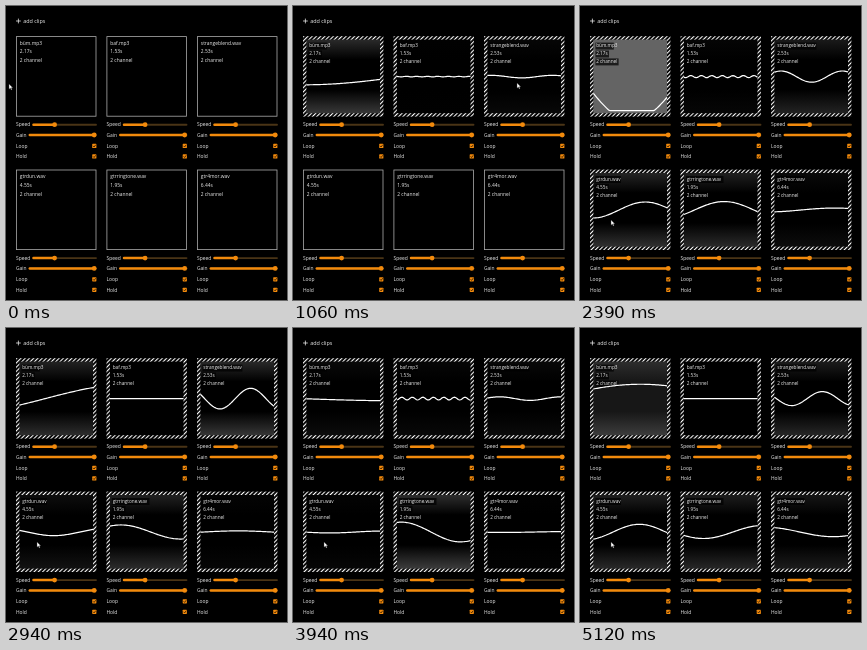
Animation, 281 px wide and 294 px high, one loop 5.18 s. Source, as an HTML page:

```html
<!DOCTYPE html>
<html lang="en">
<head>
<meta charset="utf-8">
<title>Clip launcher</title>
<style>
  html, body { margin: 0; width: 100%; height: 100%; overflow: hidden; background: #000; }
  svg { display: block; width: 281px; height: 294px; }
  text { font: 4.9px "Open Sans", "Noto Sans", sans-serif; fill: #eee; }
  .add { font-size: 5.4px; }
  .live text { font-size: 4.7px; }
  .idle rect { fill: none; stroke: #aaa; stroke-width: .8; }
  .wave { fill: none; stroke: #fff; stroke-width: 1.2; stroke-linejoin: round; }
  .rail { stroke: #4a3416; stroke-width: 1.9; stroke-linecap: round; }
  .fill { stroke: #f28a0c; stroke-width: 2.5; stroke-linecap: round; }
  .orange { fill: #f28a0c; }
  .tick { fill: none; stroke: #2a1600; stroke-width: .8; }
</style>
</head>
<body>
<svg viewBox="0 0 281 294">
  <defs>
    <pattern id="hatch" width="3" height="3" patternUnits="userSpaceOnUse" patternTransform="rotate(45)">
      <rect width="1.1" height="3" fill="#fff"/>
    </pattern>
  </defs>
  <path d="M10 15h4.8M12.4 12.6v4.8" stroke="#fff" stroke-width=".7"/>
  <text class="add" x="17.2" y="17">add clips</text>
  <g id="tiles"></g>
  <path id="cursor" d="M0 0V5.2L1.3 4.1L2.2 6L3.1 5.6L2.3 3.8H3.8Z" fill="#fff" stroke="#333" stroke-width=".4"/>
</svg>
<script>
const LOOP = 5180, SIZE = 80.4, MID = 40.4, PEAK = 34;

// start, every: trigger time and repeat in ms (every defaults to the clip length)
// amp, decay:   level and its fade in ms (negative swells)
// cycles:       periods across the tile; bend adds pitch at the attack
// hz, phase:    speed and offset of the running wave
const clips = [
  { name: 'büm.mp3', len: 2.17, start: 220, amp: 44, decay: 500, cycles: .18, bend: 1, hz: 13.39, phase: .06 },
  { name: 'baf.mp3', len: 1.53, start: 560, amp: 9, decay: 140, cycles: 7, hz: 31, phase: 0 },
  { name: 'strangeblend.wav', len: 2.53, start: 640, amp: .8, decay: -900, cycles: 1.2, hz: 5.98, phase: .35 },
  { name: 'gtrdun.wav', len: 4.55, start: 2050, every: 2700, amp: 13, decay: 700, cycles: .7, hz: 13.94, phase: .94 },
  { name: 'gtrringtone.wav', len: 1.95, start: 1600, amp: 11, decay: 3000, cycles: .62, hz: 27.72, phase: .16 },
  { name: 'gtr4mor.wav', len: 6.44, start: 1270, every: 3600, amp: 6, decay: 1000, cycles: .55, hz: 16.67, phase: .46 }
];

// Repaint runs: [first, interval]
const runs = [
  [0, 150], [150, 70], [700, 60], [1270, 65], [1850, 60],
  [2390, 65], [2940, 55], [3490, 65], [4060, 65], [4640, 60]
];

// Pointer route: [time, x, y]
const route = [
  [150, 3, 78], [220, 16, 77], [640, 194, 77], [1060, 224, 77],
  [1270, 228, 168], [1790, 144, 211], [2200, 31, 214]
];

const slider = (label, y, from, to) => `
  <text y="${y + 1.8}">${label}</text>
  <path class="rail" d="M${from} ${y}H80"/>
  <path class="fill" d="M${from} ${y}H${to}"/>
  <circle class="orange" cx="${to}" cy="${y}" r="2.4"/>`;

const checkbox = (label, y) => `
  <text y="${y + 1.8}">${label}</text>
  <rect class="orange" x="76.2" y="${y - 2.1}" width="4.2" height="4.2" rx=".6"/>
  <path class="tick" d="M77.1 ${y}l1 1.1l1.6-2.2"/>`;

function tileMarkup(clip, i) {
  const x = 10 + (i % 3) * 90.5, y = 30.2 + (i > 2) * 133.4;
  const lines = [clip.name, clip.len + 's', '2 channel'];
  const idle = lines.map((s, n) => `<text x="3.8" y="${8.4 + n * 8.8}">${s}</text>`).join('');
  const live = lines.map((s, n) => `
    <rect x="5.4" y="${6.4 + n * 7.9}" width="${s.length * 2.4 + 1.6}" height="7" fill="#000" opacity=".72"/>
    <text x="6.2" y="${11.3 + n * 7.9}">${s}</text>`).join('');
  const stops = [0, .27, .68, 1].map(o => `<stop offset="${o}"/>`).join('');
  return `<g transform="translate(${x} ${y})">
    <g class="idle"><rect x=".4" y=".4" width="${SIZE - .8}" height="${SIZE - .8}"/>${idle}</g>
    <g class="live">
      <linearGradient id="glow${i}" x2="0" y2="1">${stops}</linearGradient>
      <rect x="3.4" y="3.4" width="73.6" height="73.6" fill="url(#glow${i})"/>
      <rect x="1.7" y="1.7" width="77" height="77" fill="none" stroke="url(#hatch)" stroke-width="3.4"/>
      ${live}<path class="wave"/>
    </g>
    ${slider('Speed', 88.5, 17.5, 38.6)}${slider('Gain', 98.8, 13.8, 78.2)}
    ${checkbox('Loop', 109.7)}${checkbox('Hold', 120.2)}
  </g>`;
}

const tiles = document.getElementById('tiles');
const cursor = document.getElementById('cursor');
tiles.innerHTML = clips.map(tileMarkup).join('');
const parts = [...tiles.children].map(el => ({
  idle: el.querySelector('.idle'),
  live: el.querySelector('.live'),
  wave: el.querySelector('.wave'),
  stops: el.querySelectorAll('stop')
}));

function waveAt({ len, start, every = len * 1000, amp, decay, cycles, bend = 0, hz, phase }, t) {
  const age = (t - start) % every;
  const level = amp * Math.exp(-age / decay);
  const span = cycles * (1 + bend * Math.exp(-age / 300));
  return Array.from({ length: 61 }, (_, n) => {
    const y = level * Math.sin(2 * Math.PI * (hz * t / 1000 + phase + span * n / 60));
    return Math.max(-PEAK, Math.min(PEAK, y));
  });
}

const trace = ys => 'M' + ys.map((y, n) =>
  `${(3.4 + 73.6 * n / (ys.length - 1)).toFixed(2)} ${(MID + y).toFixed(2)}`).join('L');

function pointer(t) {
  const k = route.findIndex(p => p[0] > t);
  if (k === 0) return route[0].slice(1);
  if (k < 0) return route[route.length - 1].slice(1);
  const [a, b] = [route[k - 1], route[k]], u = (t - a[0]) / (b[0] - a[0]);
  return [1, 2].map(c => a[c] + (b[c] - a[c]) * u);
}

function paint(t) {
  clips.forEach((clip, i) => {
    const p = parts[i], on = t >= clip.start;
    p.idle.style.display = on ? 'none' : '';
    p.live.style.display = on ? '' : 'none';
    if (!on) return;
    const ys = waveAt(clip, t);
    const loud = ys.reduce((s, y) => s + Math.abs(y), 0) / ys.length;
    const mid = Math.min(100, 4.5 * Math.max(0, loud - 8));
    const edge = Math.min(60, loud * 9);
    p.wave.setAttribute('d', trace(ys));
    [Math.max(mid, edge * .75), mid, mid, Math.max(mid, edge)].forEach((v, n) => {
      p.stops[n].setAttribute('stop-color', `rgb(${v},${v},${v})`);
    });
  });
  cursor.setAttribute('transform', `translate(${pointer(t)})`);
}

function snap(t) {
  const [first, gap] = runs.filter(r => r[0] <= t).pop();
  return first + Math.floor((t - first) / gap) * gap;
}

let shown = -1;
const origin = performance.now();
function loop() {
  const now = snap((performance.now() - origin) % LOOP);
  if (now !== shown) paint(shown = now);
  requestAnimationFrame(loop);
}
loop();
</script>
</body>
</html>
```
